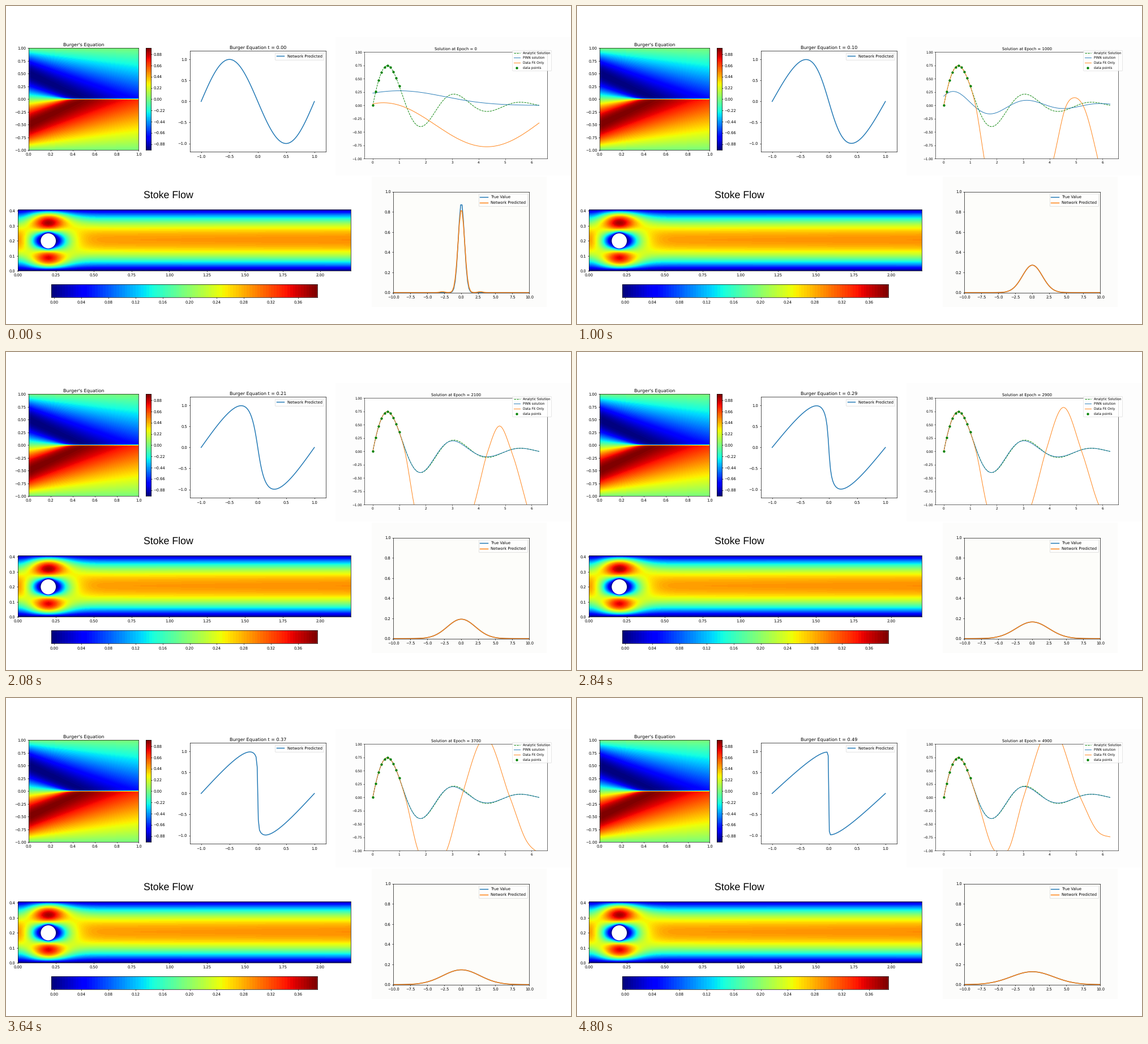
Animation, 998 px wide and 561 px high, one loop 4880 ms. Source, as a matplotlib script:

```python
import numpy as np
import matplotlib.pyplot as plt
from matplotlib.animation import FuncAnimation
from matplotlib.patches import Circle, Rectangle

W, H, DPI = 998, 561, 100
STATES, TICKS, TICK_MS = 50, 122, 40
plt.rcParams.update({"font.family": "DejaVu Sans", "text.hinting": "none"})
fig = plt.figure(figsize=(W / DPI, H / DPI), dpi=DPI, facecolor="white")


# ---------- layout helpers ----------
def pixel_box(left, top, right, bottom):
    return left / W, 1 - bottom / H, (right - left) / W, (bottom - top) / H


def backdrop(color, *edges):
    x, y, w, h = pixel_box(*edges)
    fig.add_artist(Rectangle((x, y), w, h, transform=fig.transFigure,
                             facecolor=color, edgecolor="none", zorder=-1))


def labels(ticks, digits):
    return [f"{v:.{digits}f}".replace("-", "\u2212") for v in ticks]


def panel(edges, scale, xlim, ylim, xticks=(), yticks=(), digits=(1, 2)):
    ax = fig.add_axes(pixel_box(*edges))
    ax.set_xlim(*xlim)
    ax.set_ylim(*ylim)
    ax.set_xticks(xticks, labels(xticks, digits[0]))
    ax.set_yticks(yticks, labels(yticks, digits[1]))
    ax.tick_params(labelsize=10 * scale, length=3.5 * scale,
                   width=scale, pad=3.5 * scale)
    for spine in ax.spines.values():
        spine.set_linewidth(scale)
    return ax


def title(ax, text, scale):
    return ax.set_title(text, fontsize=12 * scale, pad=6 * scale)


def legend(ax, scale, **options):
    box = ax.legend(fontsize=10 * scale, loc="upper right", **options)
    box.get_frame().set_linewidth(scale)


def field(ax, data, levels):
    """Banded colour image over the whole axes; colours span its value range."""
    low, high = levels[0], levels[-1]
    ax.imshow(data, cmap=plt.get_cmap("jet", len(levels) - 1), vmin=low, vmax=high,
              extent=(*ax.get_xlim(), *ax.get_ylim()), origin="lower",
              aspect="auto", interpolation="bilinear")


# ---------- Burgers equation ----------
NODES, WEIGHTS = np.polynomial.hermite.hermgauss(100)
NU = 0.01 / np.pi


def burgers(x, t):
    """Cole-Hopf solution for u(x, 0) = -sin(pi x)."""
    y = np.asarray(x)[..., None] - np.sqrt(4 * NU * np.asarray(t))[..., None] * NODES
    kernel = WEIGHTS * np.exp(-np.cos(np.pi * y) / (2 * np.pi * NU))
    return -(np.sin(np.pi * y) * kernel).sum(-1) / kernel.sum(-1)


# ---------- Stokes flow past a cylinder ----------
LENGTH, HEIGHT, REACH = 2.2, 0.41, 1.2
CENTER, RADIUS = (0.2, 0.2), 0.05


def channel(x, y):
    return 4 * (0.2857 + 0.003 * x) * y * (HEIGHT - y) / HEIGHT**2


def stokeslets(px, py, sx, sy):
    dx, dy = px[:, None] - sx, py[:, None] - sy
    r2 = dx**2 + dy**2 + 1e-12
    log = -0.5 * np.log(r2)
    cross = dx * dy / r2
    return np.block([[log + dx**2 / r2, cross], [cross, log + dy**2 / r2]])


def outline(pad, step, radius, count):
    """Channel walls moved out by pad, plus a ring round the cylinder."""
    x = np.arange(-pad, REACH + pad + 1e-9, step)
    y = np.arange(-pad, HEIGHT + pad + 1e-9, step)
    a = np.arange(count) * 2 * np.pi / count
    px = [x, x, 0 * y - pad, 0 * y + REACH + pad, CENTER[0] + radius * np.cos(a)]
    py = [0 * x - pad, 0 * x + HEIGHT + pad, y, y, CENTER[1] + radius * np.sin(a)]
    return np.concatenate(px), np.concatenate(py)


def stokes_flow():
    """Horizontal velocity by the method of fundamental solutions."""
    ring = 48
    bx, by = outline(0, 0.02, RADIUS, ring)
    sx, sy = outline(0.06, 0.04, 0.03, ring // 2)
    wanted = np.zeros(2 * len(bx))
    wanted[len(bx) - ring:len(bx)] = -channel(bx[-ring:], by[-ring:])
    force = np.linalg.lstsq(stokeslets(bx, by, sx, sy), wanted, rcond=1e-10)[0]
    gx, gy = np.meshgrid(np.linspace(0, LENGTH, 441), np.linspace(0, HEIGHT, 83))
    u = channel(gx, gy)
    near = gx <= REACH
    u[near] += np.split(stokeslets(gx[near], gy[near], sx, sy) @ force, 2)[0]
    return u


# ---------- damped oscillator and its two learners ----------
X = np.linspace(0, 2 * np.pi, 300)
EARLY = 10  # state at which both learners have left their first guess


def oscillator(x):
    return np.exp(-x / 2) * np.sin(2.5 * x)


def mix(a, b, w):
    return a + (b - a) * w


def spline(x, points):
    px, py = np.array(points, float).T
    m = np.gradient(py, px)
    i = np.clip(np.searchsorted(px, x, "right") - 1, 0, len(px) - 2)
    h = px[i + 1] - px[i]
    t = (x - px[i]) / h
    return ((1 + 2 * t) * (1 - t)**2 * py[i] + t * (1 - t)**2 * h * m[i]
            + t * t * (3 - 2 * t) * py[i + 1] + t * t * (t - 1) * h * m[i + 1])


def pinn(k):
    first = 0.275 * np.exp(-((X - 1) / 2.4)**2)
    early = 0.302 * np.exp(-0.36 * X) * np.cos(2.26 * (X - 0.425))
    if k <= EARLY:
        return mix(first, early, (k / EARLY)**0.8)
    error = 1.15 - 0.55 * k / STATES
    lead = 0.03 * error * np.exp(-((X - 3) / 1.2)**2)
    damping = 1 - 0.14 * error * np.exp(-((X - 4) / 1.2)**2)
    settle = 1 - max(0, 1 - (k - EARLY) / 11)**2
    return mix(early, damping * oscillator(X + lead), settle)


def data_fit(k):
    """Fits the data up to x = 1; beyond it a trough and a hump drift left."""
    first = (-0.365 + 0.415 * np.cos((X - 0.4) * np.pi / 3.93)
             + 0.04 * (X / (2 * np.pi))**6)
    p = max(0, (k - EARLY) / (STATES - 1 - EARLY))
    e = np.sin(np.pi * p / 2)**2
    rise, end = 4.15 - 1.74 * e, -2.1 + 1.36 * e
    points = [(0.9, oscillator(0.9)), (1, oscillator(1)), (1.2 + 0.04 * p, 0),
              (1.53 + 0.39 * p**2, -1),
              (2.8 - 0.63 * e, -1.05 - 2.75 * (1 - p)**2),
              (rise, -1), (rise + 0.48 + 0.12 * p, 0),
              (4.95 - 0.91 * e, 0.145 + 1.18 * e**0.75),
              (5.26 - 0.1 * e, 0), (5.82, -1 + 0.36 * e**3),
              (2 * np.pi, end), (6.8, end)]
    fitted = np.where(X < 1, oscillator(X), spline(X, points))
    return mix(first, fitted, min(1, k / EARLY)**0.7)


def gaussian(x, variance):
    return np.exp(-x * x / (2 * variance)) / np.sqrt(2 * np.pi * variance)


# ---------- Burgers field ----------
S1 = 0.488
ax1 = panel((40.3, 74.3, 234.3, 254.3), S1, (0, 1), (-1, 1),
            np.linspace(0, 1, 6), np.linspace(-1, 1, 9))
space, time = np.meshgrid(np.linspace(-1, 1, 181), np.linspace(0, 1, 98), indexing="ij")
LEVELS = np.linspace(-1, 1, 101)
field(ax1, burgers(space, time), LEVELS)
title(ax1, "Burger's Equation", S1)
bar1 = panel((246.7, 74.3, 255.8, 254.3), S1, (0, 1), (-1, 1), (), np.arange(-4, 5) * 0.22)
bar1.yaxis.tick_right()
field(bar1, np.linspace(-1, 1, 400)[:, None], LEVELS)

# ---------- Burgers profile ----------
S2 = 0.484
ax2 = panel((324.7, 79.4, 564.7, 257.4), S2, (-1.2, 1.2), (-1.2, 1.2),
            np.linspace(-1, 1, 5), np.linspace(-1, 1, 5), (1, 1))
BX = np.linspace(-1, 1, 100)
wave, = ax2.plot([], [], lw=2.2 * S2, color="tab:blue", label="Network Predicted")
wave_title = title(ax2, "", S2)
legend(ax2, S2)

# ---------- oscillator ----------
S3 = 0.414
backdrop("#fdfdfd", 582, 55, 998, 299)
ax3 = panel((633.2, 81.4, 956.3, 269.4), S3, (-0.314, 6.597), (-1, 1),
            np.arange(7), np.linspace(-1, 1, 9), (0, 2))
ax3.plot(X, oscillator(X), "--", color="green", lw=1.6 * S3, label="Analytic Solution")
pinn_line, = ax3.plot([], [], color="tab:blue", lw=1.6 * S3, label="PINN solution")
fit_line, = ax3.plot([], [], color="tab:orange", lw=1.6 * S3, label="Data Fit Only")
DX = np.linspace(0, 1, 10)
ax3.plot(DX, oscillator(DX), "o", color="green", ms=6 * S3, mew=1.3 * S3,
         label="data points")
epoch_title = title(ax3, "", S3)
legend(ax3, S3, bbox_to_anchor=(1.022, 1.019), borderaxespad=0)

# ---------- Stokes flow ----------
S4 = 0.485
fig.text(287 / W, 1 - 334.5 / H, "Stoke Flow", family="Liberation Sans",
         fontsize=12.8, ha="center", va="center")
ax4 = panel((21.3, 358.7, 608.8, 467.3), S4, (0, LENGTH), (0, HEIGHT),
            np.arange(9) * 0.25, np.arange(5) * 0.1, (2, 1))
SPEEDS = np.arange(-1, 98) * 0.004
field(ax4, stokes_flow(), SPEEDS)
ax4.add_patch(Circle(CENTER, RADIUS, facecolor="white", edgecolor="none", zorder=2))
bar4 = panel((80.2, 490.8, 549.7, 514.4), S4, (SPEEDS[0], SPEEDS[-1]), (0, 1),
             np.arange(10) * 0.04, (), (2, 1))
field(bar4, np.linspace(SPEEDS[0], SPEEDS[-1], 980)[None], SPEEDS)

# ---------- spreading density ----------
backdrop("#fcfcfb", 646, 301, 955, 531)
ax5 = panel((684.3, 327.6, 924.4, 505.6), S2, (-10, 10), (0, 1),
            np.linspace(-10, 10, 9), np.linspace(0, 1, 6), (1, 1))
ax5.set_facecolor("#fdfdfa")
GX = np.linspace(-10, 10, 100)
true_line, = ax5.plot([], [], color="tab:blue", lw=2.2 * S2, label="True Value")
guess_line, = ax5.plot([], [], color="tab:orange", lw=2.2 * S2, label="Network Predicted")
legend(ax5, S2)


def update(tick):
    k = tick * STATES // TICKS
    wave.set_data(BX, burgers(BX, k / 100))
    wave_title.set_text(f"Burger Equation t = {k / 100:.2f}")
    pinn_line.set_data(X, pinn(k))
    fit_line.set_data(X, data_fit(k))
    epoch_title.set_text(f"Solution at Epoch = {100 * k}")

    variance, error = 0.2 + 0.195 * k, np.exp(-k)
    ripple = 0.009 * error * np.exp(-((np.abs(GX) - 2.8) / 0.5)**2)
    true_line.set_data(GX, gaussian(GX, variance))
    guess_line.set_data(GX, gaussian(GX, variance + 0.032 * error) + ripple)
    return wave, wave_title, pinn_line, fit_line, epoch_title, true_line, guess_line


anim = FuncAnimation(fig, update, frames=TICKS, interval=TICK_MS,
                     repeat=True, repeat_delay=0, blit=False)
plt.show()
```
